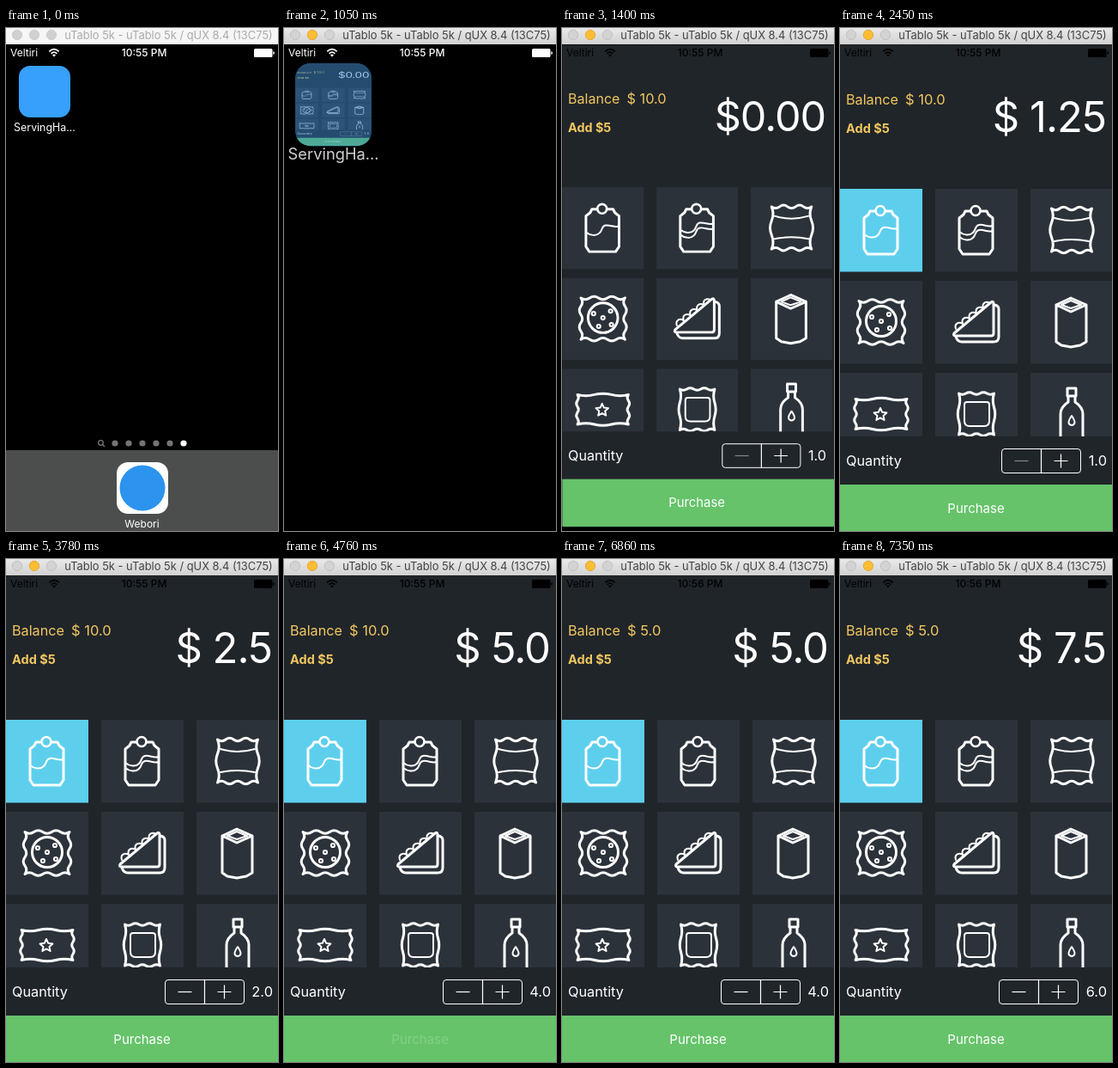
Animation of 317 by 585 pixels, one loop 8 s. Source, as an HTML page:

```html
<!DOCTYPE html>
<html lang="en">
<head>
<meta charset="utf-8">
<title>Snack kiosk demo</title>
<style>
html, body { margin: 0; width: 100%; height: 100%; overflow: hidden; background: #000; }
svg { display: block; width: 317px; height: 585px; font-family: Inter, Roboto, sans-serif; }
.line { fill: none; stroke: #fff; stroke-width: 3; stroke-linecap: round; stroke-linejoin: round; }
.thin { stroke-width: 2; }
</style>
</head>
<body>
<svg id="stage" viewBox="0 0 317 585" xmlns="http://www.w3.org/2000/svg"></svg>
<script>
const LOOP = 8000, STEP = 70;
const ICON = { x: 15, y: 44, w: 60, h: 60 };
const APP = { x: 0, y: 19, w: 320, h: 568 };
const INK = '#20252a', GOLD = '#f2c75f';

const text = (x, y, size, str, extra = '') =>
  `<text x="${x}" y="${y}" font-size="${size}" ${extra}>${str}</text>`;
const rect = (x, y, w, h, fill, extra = '') =>
  `<rect x="${x}" y="${y}" width="${w}" height="${h}" fill="${fill}" ${extra}/>`;
const dot = (x, y, r, extra = '') => `<circle cx="${x}" cy="${y}" r="${r}" ${extra}/>`;
const line = (d, cls = '') => `<path class="${cls}" d="${d}"/>`;

// Product drawings, each centred on its tile.
const can = waves =>
  line('M-7-22H-13L-15-18L-20-14V22L-16 28H15L19 22V-14L14-18L12-22H5') +
  dot(-1, -22.5, 5.5, 'stroke-width="2.6"') + waves;
const wave = y => line(`M-20 ${y}c5 4 12 5 16 1c4-4 2-8 7-9c6-1 10 3 16 1`, 'thin');

// One edge of a wrapper: n bumps that turn in and out by a.
const edge = (n, dx, dy, a) => Array.from({ length: n }, (_, i) => {
  const s = i % 2 ? a : -a;
  return `q${dx / 2 + s * Math.sign(dy)} ${dy / 2 - s * Math.sign(dx)} ${dx} ${dy}`;
}).join('');
const pack = (w, h, nx, ny, a) => line(`M${-w / 2} ${-h / 2}` +
  edge(nx, w / nx, 0, a) + edge(ny, 0, h / ny, a) +
  edge(nx, -w / nx, 0, a) + edge(ny, 0, -h / ny, a) + 'z');

const products = [
  can(wave(5)),
  can(wave(2) + wave(8)),
  pack(47, 50, 5, 3, 3.5) + line('M-20-14Q0-8 20-14M-20 13Q0 9 20 13', 'thin'),
  pack(52, 49, 5, 5, 3.5) + dot(0, -1, 17.5) +
    [[-11, -6], [9, -9], [0, -1], [10, 7], [-5, 9]].map(p => dot(...p, 2.1, 'class="thin"')).join(''),
  line('M-26 13L17-23Q20-25 20-21V13Q20 16 17 16H-24Q-28 16-26 13Z') +
    line('M21-20q5 1 5 5V17Q26 23 20 23H-17q-5 0-7-6') +
    line('M-24 8' + 'c-2-6 3-9 8-6'.repeat(5), 'thin'),
  line('M-18-20L-1-28L17-20V23L10 27L-1 29L-12 27L-18 23ZM-18-20L-1-12L17-20') +
    line('M-12-20L-1-25L11-20L-1-16Z', 'thin'),
  pack(60, 35, 3, 5, 2.5) +
    line('M-1-7l2.2 4.8 5.2.6-3.9 3.5 1.1 5.1-4.6-2.6-4.6 2.6 1.1-5.1-3.9-3.5 5.2-.6z', 'thin'),
  pack(41, 48, 5, 3, 2.5) +
    line('M-11-14H12q3 0 3 3V8q0 6-6 6H-8q-6 0-6-6V-11q0-3 3-3z', 'thin'),
  line('M-5-30H5V-21H-5ZM-4-20V-14Q-13-8-13 0V34H13V0Q13-8 4-14V-20') +
    line('M0 2q-7 10 0 11q7-1 0-11z', 'thin')
];

const tiles = products.map((art, i) => {
  const x = i % 3 * 111, y = 187 + Math.floor(i / 3) * 107;
  return rect(x, y, 96, 96.5, '#2c323a', i ? '' : 'id="pick"') +
    `<g class="line" transform="translate(${x + 48} ${y + 48})">${art}</g>`;
}).join('');

const app = rect(0, 19, 320, 568, INK) + tiles + rect(0, 475, 320, 56, INK) +
  `<g fill="${GOLD}">` +
  text(7, 89, 16.2, 'Balance') + text(76, 89, 16.5, '', 'id="balance"') +
  text(7, 122, 14.5, 'Add $5', 'font-weight="700"') + '</g><g fill="#fff">' +
  text(310, 121, 49, '', 'id="price" text-anchor="end" letter-spacing="-1"') +
  text(7, 509, 16.3, 'Quantity') + text(311, 509, 16.4, '', 'id="count" text-anchor="end"') + '</g>' +
  `<g id="stepper">` + rect(46.5, 489.5, 46, 28, '#fff', 'id="press" opacity="0"') +
  rect(.5, 489.5, 92, 28, 'none', 'rx="3.5" stroke="#fff"') +
  `<path d="M46.5 489.5V517.5M61.5 503.5H77.5M69.5 495.5V511.5" stroke="#fff" stroke-width="1.2"/>` +
  `<path id="minus" d="M15.5 503.5H31.5" stroke="#fff" stroke-width="1.2"/></g>` +
  rect(0, 531, 320, 56, '#66c36a') +
  text(158.5, 564, 15, 'Purchase', 'id="buy" fill="#fff" text-anchor="middle"');

const home = text(45, 120, 12.4, 'ServingHa...', 'fill="#fff" text-anchor="middle"') +
  `<g fill="none" stroke="#777" stroke-width="1.3">${dot(110.5, 482.5, 2.8)}<path d="M112.5 484.5L115 487"/></g>` +
  [127, 143, 159, 175, 191, 207].map(x => dot(x, 483, 3.6, `fill="${x > 200 ? '#fff' : '#747474'}"`)).join('') +
  rect(0, 491, 317, 94, '#4c4e4d') + rect(129, 505, 60, 60, '#fff', 'rx="13"') +
  dot(159, 535, 26.5, 'fill="#2c93ee"') +
  text(158.5, 581, 12, 'Webori', 'fill="#fff" text-anchor="middle"');

const status = text(5, 33, 12, 'Veltiri') +
  `<g fill="none" stroke="currentColor" stroke-width="1.7"><path d="M50.3 27.4Q56 22 61.7 27.4M52.6 29.8Q56 26.6 59.4 29.8"/></g>` +
  `<path d="M54 31.4Q56 29.8 58 31.4L56 33.6Z"/>` +
  text(161, 33, 12, '', 'id="clock" text-anchor="middle" font-weight="500"') +
  `<rect x="289" y="24" width="21.5" height="10" rx="1.5"/><path d="M311.4 27v4q1.6-.6 1.6-2t-1.6-2z"/>`;

const $ = id => document.getElementById(id);
$('stage').innerHTML =
  `<defs><linearGradient id="bar" x2="0" y2="1"><stop stop-color="#e9e9e9"/><stop offset="1" stop-color="#d2d2d2"/></linearGradient>
  <clipPath id="clip">${rect(0, 0, 0, 0, '#000', 'id="frame"')}</clipPath></defs>` +
  rect(0, 0, 317, 585, '#000') + `<g id="home">${home}</g>` +
  rect(0, 0, 0, 0, '#36a0fc', 'id="icon"') + rect(0, 0, 0, 0, '#000', 'id="shade"') +
  `<g id="view" clip-path="url(#clip)"><g id="app">${app}</g></g><g id="status">${status}</g>` +
  rect(0, 0, 317, 19, '', 'id="title"') +
  [13, 33, 53].map(x => dot(x, 8, 5.7, `id="light${x}"`)).join('') +
  text(189.5, 13, 12.9, 'uTablo 5k - uTablo 5k / qUX 8.4 (13C75)', 'id="name" text-anchor="middle"');

const set = (id, attrs) => {
  for (const k in attrs) $(id).setAttribute(k, attrs[k]);
};
const clamp = v => Math.max(0, Math.min(1, v));
const mix = (a, b, p) => a + (b - a) * p;
const money = v => '$ ' + (v % 1 ? v : v.toFixed(1));

const counts = [[0, 1], [3780, 2], [3990, 3], [4200, 4], [4970, 1],
  [6510, 2], [6720, 3], [6860, 4], [7070, 5], [7350, 6]];
const presses = [[3640, 3780], [3850, 3990], [4060, 4200], [6370, 6510],
  [6580, 6860], [6930, 7140], [7210, 7350]];

// Share of the launch zoom that is done.
const zoom = t => t < 980 ? 0 : t >= 1750 ? 1 : 1 - Math.exp(-.1165 * ((t - 960) / 90) ** 2.29);

function drawLaunch(t) {
  const p = zoom(t);
  const x = mix(ICON.x, APP.x, p), y = mix(ICON.y, APP.y, p);
  const w = mix(ICON.w, APP.w, p), h = mix(ICON.h, APP.h, p ** 1.2);
  const s = w / ICON.w, box = { x, y, width: w, height: h, rx: 13 * s * (1 - p) };
  for (const id of ['icon', 'shade', 'frame']) set(id, box);
  set('shade', { opacity: t >= 840 ? clamp(.5 - 3 * p) : 0 });
  set('home', { transform: `translate(${x} ${y}) scale(${s}) translate(${-ICON.x} ${-ICON.y})`, opacity: clamp(1 - 1.6 * p) });
  set('view', { opacity: clamp(p * 5.3) });
  set('icon', { opacity: p > .3 ? 0 : 1 });
  set('app', { transform: `translate(${x} ${y}) scale(${w / APP.w} ${h / APP.h}) translate(0 ${-APP.y})` });
  const g = Math.round(255 * (1 - clamp((p - .3) / .4)));
  set('status', { fill: `rgb(${g},${g},${g})`, color: `rgb(${g},${g},${g})` });
}

function drawWindow(t) {
  const on = t >= 840;
  set('title', { fill: on ? 'url(#bar)' : '#f6f6f6' });
  set('name', { fill: on ? '#434343' : '#aaa' });
  for (const x of [13, 33, 53]) {
    const amber = on && x === 33;
    set('light' + x, { fill: amber ? '#fdbd33' : on ? '#d3d3d3' : '#d0d0d0', stroke: amber ? '#e0a02c' : on ? '#bcbcbc' : '#cacaca', 'stroke-width': .8 });
  }
}

function drawApp(t) {
  const n = counts.filter(c => c[0] <= t).pop()[1];
  const picked = t >= 2450;
  set('pick', { fill: picked ? '#5dcfed' : '#2c323a' });
  $('price').textContent = picked ? money(n * 1.25) : '$0.00';
  $('count').textContent = n.toFixed(1);
  $('balance').textContent = money(t < 4970 ? 10 : 5);
  $('clock').textContent = t < 6230 ? '10:55 PM' : '10:56 PM';
  set('stepper', { transform: `translate(${n > 1 ? 185 : 188} 0)` });
  set('minus', { opacity: n > 1 ? 1 : .45 });
  set('press', { opacity: presses.some(([a, b]) => t >= a && t < b) ? .25 : 0 });
  set('buy', { opacity: t < 4760 ? 1 : t < 4970 ? .2 : clamp(mix(.2, 1, (t - 4900) / 490)) });
}

function draw(now) {
  const t = Math.floor(now % LOOP / STEP) * STEP;
  drawWindow(t);
  drawLaunch(t);
  drawApp(t);
}

const start = performance.now();
function tick() {
  draw(performance.now() - start);
  requestAnimationFrame(tick);
}
tick();
</script>
</body>
</html>
```
